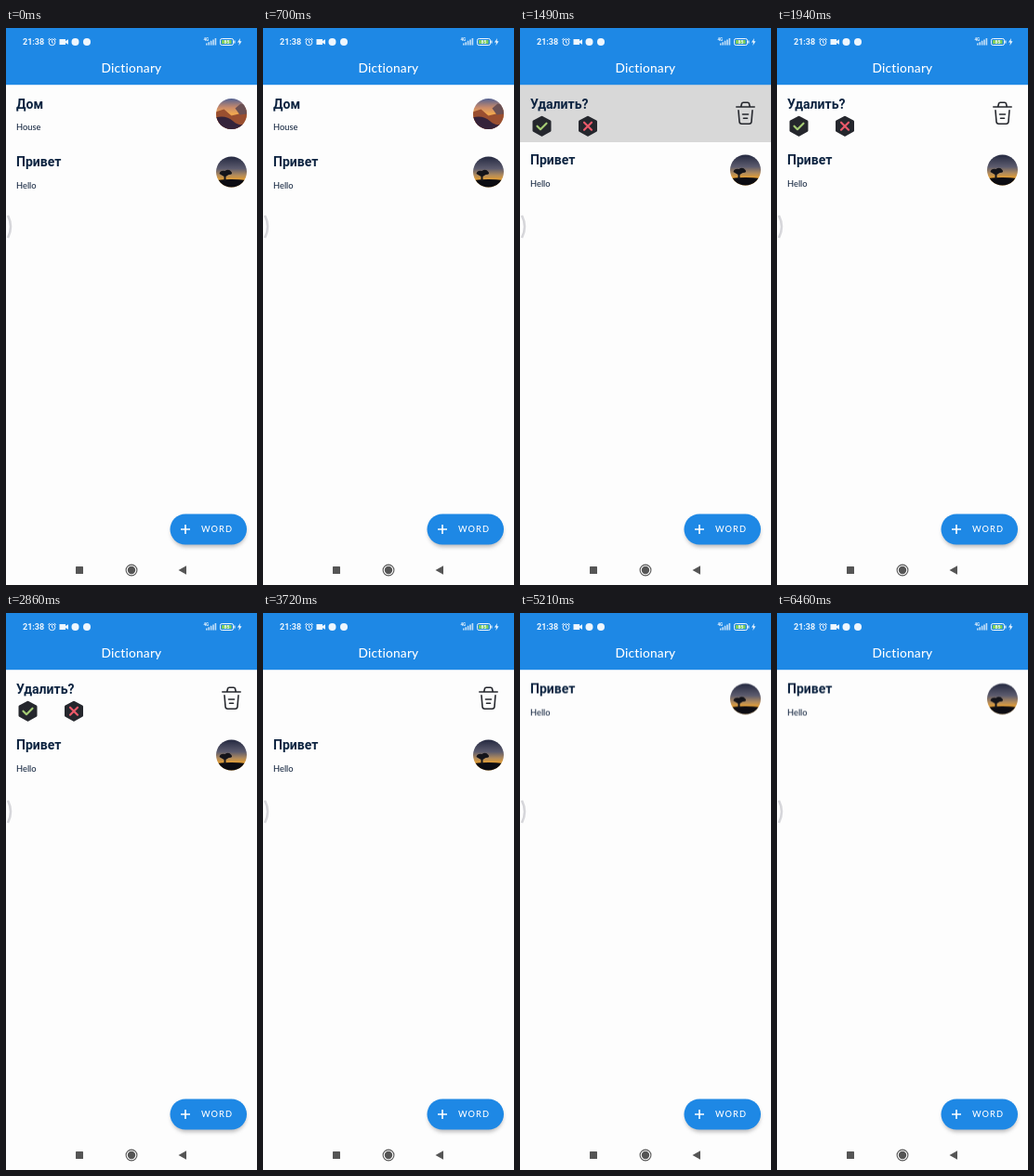
An HTML page that plays this animation: 270 by 600 pixels, repeating every 6.51 s.

```html
<!DOCTYPE html>
<html lang="ru">
<head>
<meta charset="utf-8">
<title>Dictionary</title>
<style>
  html, body { margin: 0; width: 100%; height: 100%; overflow: hidden; background: #fdfdfd; }
  svg { display: block; width: 270px; height: 600px; }
  text { font-family: Lato, sans-serif; }
  .word { font: 700 14px Roboto, sans-serif; fill: #0c2340; }
  .note { font-size: 9.3px; font-weight: 500; fill: #1b2c45; }
  .anim { animation: 6510ms linear infinite; }

  .ripple { animation-name: ripple; transform-origin: 58px 92px; }
  .entry { animation-name: entry; }
  .ask { animation-name: ask; }
  .trash { animation-name: trash; }
  .next { animation-name: next; }

  @keyframes ripple {
    0%, 13.05% { transform: scale(.25); opacity: 0; fill: #e4e4e4; }
    13.9% { opacity: 1; }
    15.21% { transform: scale(1); }
    17.67% { transform: scale(2); }
    19.96% { fill: #e4e4e4; }
    19.97% { fill: #d8d8d8; }
    23.96% { transform: scale(2); opacity: 1; }
    26.2%, 100% { transform: scale(2); opacity: 0; fill: #d8d8d8; }
  }
  @keyframes entry {
    0%, 19.96% { opacity: 1; }
    19.97%, 100% { opacity: 0; }
  }
  @keyframes ask {
    0%, 19.96% { opacity: 0; }
    19.97%, 52.23% { opacity: 1; }
    55.91%, 100% { opacity: 0; }
  }
  @keyframes trash {
    0%, 19.96% { opacity: 0; }
    19.97%, 61.44% { opacity: 1; }
    66.05%, 100% { opacity: 0; }
  }
  @keyframes next {
    0%, 19.96% { transform: translateY(0); }
    19.97% { transform: translateY(-2px); }
    71.53% { transform: translateY(-2px); animation-timing-function: cubic-bezier(.37, 0, .63, 1); }
    75.37%, 100% { transform: translateY(-62.5px); }
  }
</style>
</head>
<body>
<svg viewBox="0 0 270 600">
  <defs>
    <clipPath id="row"><rect y="61" width="270" height="62"/></clipPath>
    <clipPath id="disc"><circle r="16.5"/></clipPath>
    <linearGradient id="dawn" x2="0" y2="1">
      <stop offset="0" stop-color="#4c5f94"/>
      <stop offset=".3" stop-color="#c98a6a"/>
      <stop offset=".5" stop-color="#f0a850"/>
      <stop offset="1" stop-color="#70352a"/>
    </linearGradient>
    <linearGradient id="dusk" x2="0" y2="1">
      <stop offset="0" stop-color="#22273f"/>
      <stop offset=".4" stop-color="#5d5c6e"/>
      <stop offset=".6" stop-color="#b08a5c"/>
      <stop offset=".76" stop-color="#e8a030"/>
    </linearGradient>
    <filter id="soft" x="-20%" y="-40%" width="140%" height="200%">
      <feGaussianBlur stdDeviation="2.2"/>
    </filter>
    <path id="hex" d="M0-9.5 8.5-4.8V4.8L0 9.5-8.5 4.8V-4.8Z" fill="#25272d" stroke="#25272d" stroke-width="3" stroke-linejoin="round"/>
  </defs>

  <rect width="270" height="600" fill="#fdfdfd"/>

  <!-- first row -->
  <g clip-path="url(#row)"><circle class="anim ripple" cx="58" cy="92" r="120.5"/></g>
  <g class="anim entry">
    <text class="word" x="11" y="86.5">Дом</text>
    <text class="note" x="11" y="110.3">House</text>
    <g transform="translate(242.5 92.5)" clip-path="url(#disc)">
      <rect x="-17" y="-17" width="34" height="34" fill="url(#dawn)"/>
      <path d="M-17-2-8-5 0 2 8 0 17-8V17H-17Z" fill="#9a4f30"/>
      <path d="M-17 4Q-6 1 2 8T17 9V17H-17Z" fill="#35233a"/>
      <path d="M4-6 10-11 17-9V0L9 1Z" fill="#6b5054"/>
    </g>
  </g>
  <g class="anim ask">
    <text class="word" x="11" y="86.5">Удалить?</text>
    <g fill="none" stroke-width="2.2" stroke-linecap="round" stroke-linejoin="round">
      <g transform="translate(23.5 105.7)">
        <use href="#hex"/><path d="M-5 0-1.5 3.5 5-3" stroke="#a5cc74"/>
      </g>
      <g transform="translate(73 105.7)">
        <use href="#hex"/><path d="M-4-4 4 4M4-4-4 4" stroke="#ec5a6a"/>
      </g>
    </g>
  </g>
  <g class="anim trash" fill="none" stroke="#25272d" stroke-width="1.6" stroke-linecap="round" stroke-linejoin="round">
    <path d="M232.8 85H252.2M237.7 84.7 238.6 81.3Q239 80.3 240 80.3H245Q246 80.3 246.4 81.3L247.3 84.7"/>
    <path d="M235 88.8 236 100.8Q236.2 103.3 238.5 103.3H246.5Q248.8 103.3 249 100.8L250 88.8M239.5 93H245.5M240.5 97.3H244.5"/>
  </g>

  <!-- second row -->
  <g class="anim next">
    <text class="word" x="11" y="149">Привет</text>
    <text class="note" x="11" y="172.8">Hello</text>
    <g transform="translate(242.5 155)" clip-path="url(#disc)">
      <rect x="-17" y="-17" width="34" height="34" fill="url(#dusk)"/>
      <path d="M-17 9Q0 7 17 9V17H-17Z" fill="#0c0c12"/>
      <path d="M-13 2Q-12-2-7-1-3-4 0 0 2 3-3 3L-6 5V10H-8V5Z" fill="#14141a"/>
    </g>
  </g>

  <!-- header and status bar -->
  <rect width="270" height="61.2" fill="#1e88e5"/>
  <text x="135" y="47.5" text-anchor="middle" font-size="13.7" font-weight="500" letter-spacing=".2" fill="#fff">Dictionary</text>
  <g fill="#eef6fd">
    <text x="18" y="18.2" style="font:700 9px Roboto,sans-serif">21:38</text>
    <g fill="none" stroke="#eef6fd">
      <circle cx="49.5" cy="15.3" r="3.4"/>
      <path d="M49.5 13.3V15.5L51 16.4M45.2 12.7 47.2 11M53.8 12.7 51.8 11"/>
    </g>
    <path d="M57.5 12H64V14L67 12.2V17.8L64 16V18H57.5Z"/>
    <circle cx="74.5" cy="15" r="4"/>
    <circle cx="87" cy="15" r="4"/>
    <text x="212.5" y="14" style="font:700 4.5px Roboto,sans-serif">4G</text>
    <path d="M215 16.5h1.6V18.5H215ZM217.4 15.2H219V18.5H217.4ZM219.8 13.8h1.6V18.5H219.8ZM222.2 12.4h1.6V18.5H222.2ZM224.6 11H226.2V18.5H224.6Z" opacity=".8"/>
    <rect x="230.5" y="11.5" width="14" height="7" rx="1.8" fill="none" stroke="#eef6fd"/>
    <rect x="232" y="13" width="10.5" height="4" fill="#7fcf5a"/>
    <text x="237.4" y="17" text-anchor="middle" style="font:700 5px Roboto,sans-serif">85</text>
    <path d="M245.3 13.5h1.2v3h-1.2ZM252 11 249 15.6H251L250.4 19 253.5 14.2H251.5Z"/>
  </g>

  <!-- edge handle -->
  <path d="M2 202Q8 214 2 226" fill="none" stroke="#d6d6da" stroke-width="2.6"/>

  <!-- add button -->
  <rect x="178" y="527" width="80" height="32" rx="16" fill="#8c8c90" opacity=".6" filter="url(#soft)"/>
  <rect x="176.5" y="523.5" width="82.5" height="33" rx="16.5" fill="#1e88e5"/>
  <path d="M188 540H198M193 535V545" stroke="#fff" stroke-width="1.6"/>
  <text x="210" y="543.4" font-size="9.3" font-weight="500" letter-spacing="1" fill="#fff">WORD</text>

  <!-- navigation bar -->
  <g fill="#555">
    <rect x="75" y="580" width="8" height="8" rx=".6"/>
    <circle cx="135" cy="584" r="5.9" fill="none" stroke="#555" stroke-width="1.1"/>
    <circle cx="135" cy="584" r="4.2"/>
    <path d="M185.5 584 194 579.3V588.7Z"/>
  </g>
</svg>
</body>
</html>
```
